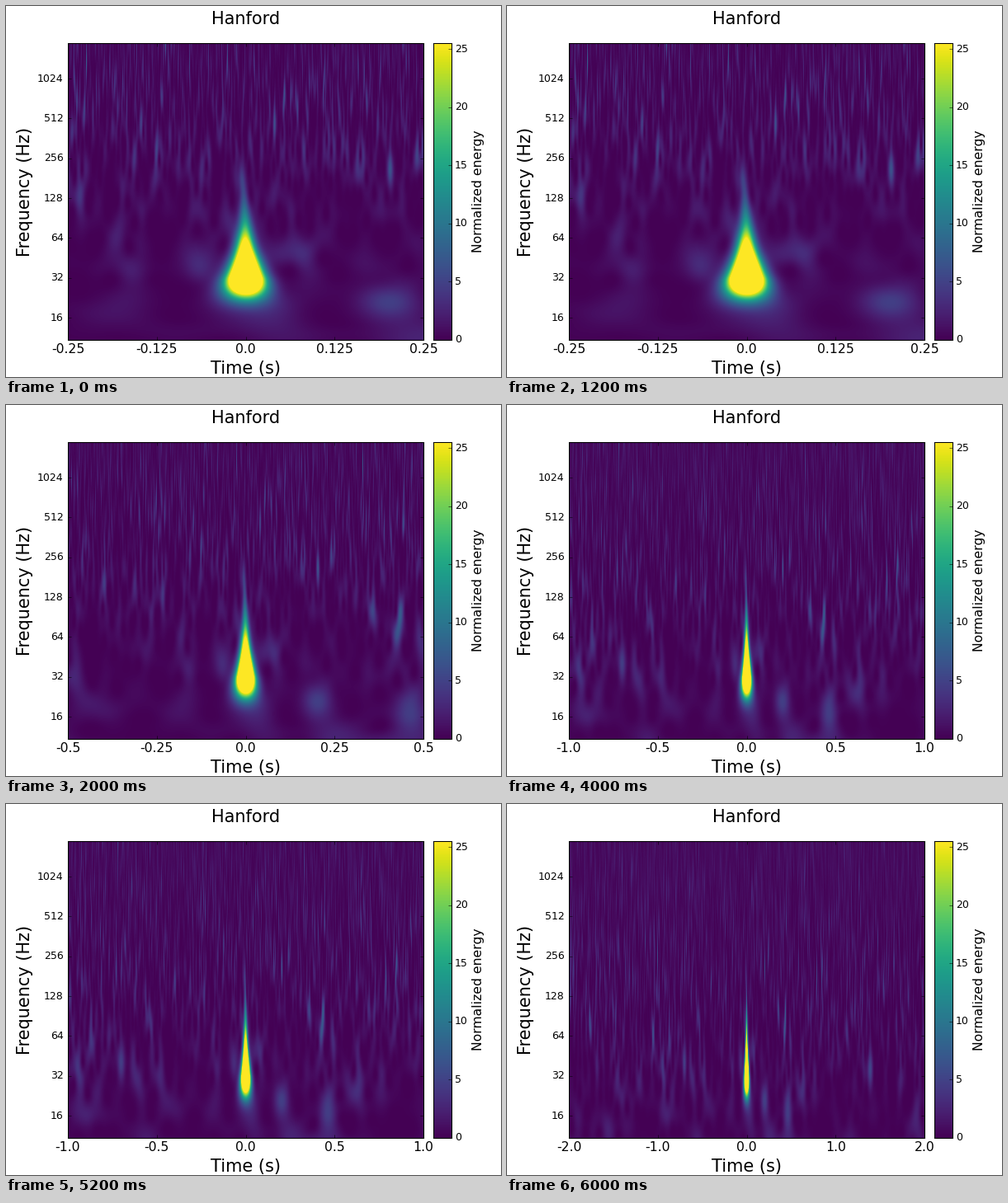
A matplotlib script for the animation above (8 s loop, 600 by 450 pixels).

```python
import numpy as np
import matplotlib.pyplot as plt
from matplotlib.animation import FuncAnimation

plt.rcParams.update({"font.family": "DejaVu Sans", "axes.linewidth": 1.0})

W, H, DPI = 600, 450, 75
LEFT, RIGHT, TOP, BOTTOM = 75, 506, 45, 405
COLS, ROWS = RIGHT - LEFT, BOTTOM - TOP
VMAX = 25.5
OCTAVE = 48.33      # pixels per octave
Y16 = 378           # height of the 16 Hz tick
RATE = 4096         # noise samples per second
SPAN = 4.0          # seconds of noise
Q = 4.2
HALF_SPANS = [0.25 * 2 ** k for k in range(4)]

# The most visible noise spots: time (s), frequency (Hz), energy
SPOTS = [(0.2, 21, 4.5), (-0.065, 42, 3), (0.203, 215, 5), (-0.7, 39, 3.5), (1.39, 34, 4.5)]

row_y = TOP + np.arange(ROWS) + 0.5
freqs = 16 * 2 ** ((Y16 - row_y) / OCTAVE)
f_col = freqs[:, None]


def cumulative_noise():
    """Running time integral of constant-Q noise energy, one row per frequency."""
    rng = np.random.default_rng(5)
    n = int(RATE * SPAN)
    half = n // 2
    spectrum = rng.normal(size=half) + 1j * rng.normal(size=half)
    bins = np.arange(half) / SPAN
    out = np.zeros((ROWS, n + 1))
    for row, f in enumerate(freqs):
        band = spectrum * np.exp(-0.5 * ((bins - f) * Q / f) ** 2)
        energy = np.abs(np.fft.ifft(band, n)) ** 2
        out[row, 1:] = np.cumsum(energy / energy.mean())
    return out


def noise_energy(total, t, step):
    edges = np.arange(total.shape[1])
    width = 0.7 * step * RATE
    mid = (t + SPAN / 2) * RATE
    rows = [np.interp(mid + width / 2, edges, row)
            - np.interp(mid - width / 2, edges, row) for row in total]
    gain = np.interp(np.log2(f_col), [5, 7.5], [0.6, 0.85])
    return np.array(rows) / width * gain


def spot_energy(t):
    return sum(peak * np.exp(-0.5 * (((t - t0) * f0 / 0.6) ** 2
                                     + (np.log2(f_col / f0) / 0.3) ** 2))
               for t0, f0, peak in SPOTS)


def signal_energy(t):
    """Loudest at 32 Hz, narrower with rising frequency, tip leaning left."""
    v = np.log2(f_col / 32)
    above, below = np.maximum(v, 0), np.maximum(-v, 0)
    peak = 60 * np.exp(-(above / 1.1) ** 1.35 - (below / 0.45) ** 1.7)
    centre = -0.00035 * v ** 3
    return peak * np.exp(-0.5 * ((t - centre) * f_col / 0.56) ** 2)


def spectrogram(half_span, total):
    step = 2 * half_span / COLS
    t = (np.arange(COLS) + 0.5) * step - half_span
    return noise_energy(total, t, step) + spot_energy(t) + signal_energy(t)


def pixel_axes(x0, x1):
    return fig.add_axes([x0 / W, 1 - BOTTOM / H, (x1 - x0) / W, (BOTTOM - TOP) / H])


def label(x, y, text, size, **style):
    fig.text(x / W, 1 - y / H, text, fontsize=size, ha="center", **style)


integral = cumulative_noise()
images = [spectrogram(half_span, integral) for half_span in HALF_SPANS]

fig = plt.figure(figsize=(W / DPI, H / DPI), dpi=DPI, facecolor="white")

ax = pixel_axes(LEFT, RIGHT)
picture = ax.imshow(images[0], cmap="viridis", vmin=0, vmax=VMAX, aspect="auto",
                    extent=[-1, 1, BOTTOM, TOP], interpolation="bilinear")
ax.tick_params(direction="in", top=True, right=True, length=4, width=0.5, pad=4)
ax.tick_params(axis="x", labelsize=15)
ax.tick_params(axis="y", labelsize=12, pad=5)
octaves = range(4, 11)
ax.set_yticks([Y16 - OCTAVE * (k - 4) for k in octaves], [str(2 ** k) for k in octaves])

bar = pixel_axes(518, 540)
bar.imshow(np.linspace(0, VMAX, 256)[:, None], cmap="viridis", aspect="auto",
           origin="lower", extent=[0, 1, 0, VMAX])
bar.set_xticks([])
bar.set_yticks(range(0, 26, 5))
bar.yaxis.tick_right()
bar.tick_params(direction="in", length=4, width=0.5, pad=4, labelsize=12)

for axes in (ax, bar):
    plt.setp(axes.get_yticklabels(), va="center")

label(290.5, 21.5, "Hanford", 20, va="baseline")
label(290.5, 440, "Time (s)", 20, va="center")
label(23, 225, "Frequency (Hz)", 20, va="center", rotation=90)
label(572.5, 225, "Normalized energy", 15, va="center", rotation=90)


def update(i):
    picture.set_data(images[i])
    times = np.linspace(-1, 1, 5) * HALF_SPANS[i]
    ax.set_xticks(np.linspace(-1, 1, 5), [str(float(t)) for t in times])
    return [picture]


anim = FuncAnimation(fig, update, frames=len(HALF_SPANS), interval=2000,
                     repeat=True, repeat_delay=0, blit=False)
plt.show()
```
